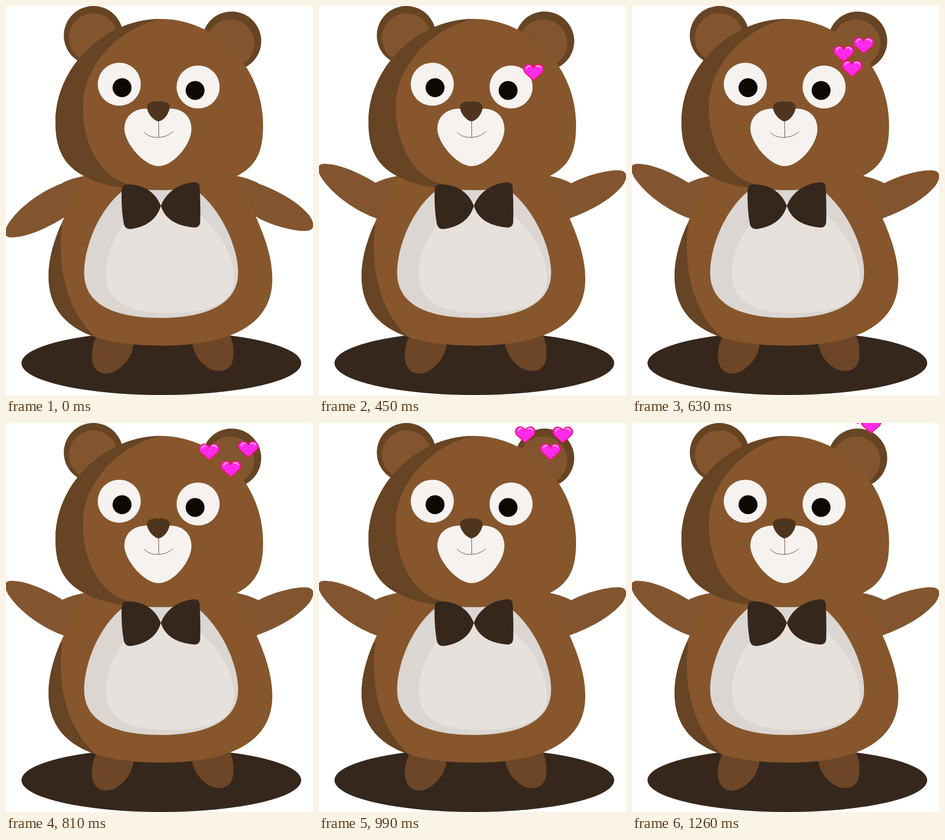
Write an HTML page that moves like this. It is 664 px wide and 843 px high and loops after 1.35 s.

```html
<!DOCTYPE html>
<html lang="en">
<head>
<meta charset="utf-8">
<title>Waving bear</title>
<style>
  html, body { margin: 0; width: 100%; height: 100%; overflow: hidden; background: #fff; }
  svg { display: block; width: 664px; height: 843px; }
  .fur { fill: #87562c; }
  .limb { fill: #82552f; }
  .shade { fill: #664424; }
  .leg { fill: #6c4626; }
  .dark { fill: #36271d; }
  .white { fill: #f6f2ef; }
  .pupil { fill: #0d0802; }
</style>
</head>
<body>
<svg viewBox="0 0 664 843">
  <defs>
    <path id="body" d="M168 368C150 420 92 500 92 585C92 705 205 736 335 736C465 736 576 702 576 592C576 510 525 430 500 368Z"/>
    <path id="head" d="M335 28C448 28 556 125 556 258C556 310 545 345 500 368C460 390 400 399 335 399C270 399 210 392 168 368C125 345 107 310 107 252C107 130 215 28 335 28Z"/>
    <clipPath id="inBody"><use href="#body"/></clipPath>
    <clipPath id="inHead"><use href="#head"/></clipPath>
    <g id="heart">
      <path d="M0 18L-18 2C-26-7-18-18-9-16Q-3-15 0-9Q3-15 9-16C18-18 26-7 18 2Z" fill="#ff2bea" stroke="#f5106a" stroke-width="2"/>
      <path d="M-15-8Q-13-13-8-13M6-12Q12-15 16-9" fill="none" stroke="#ff9df3" stroke-width="3" stroke-linecap="round"/>
    </g>
  </defs>

  <ellipse class="dark" cx="336" cy="774" rx="302.5" ry="69"/>
  <path class="leg" d="M195 718C186 735 183 760 188 775C196 800 222 801 240 789C262 774 274 755 276 730Z"/>
  <path class="leg" d="M402 728C406 755 420 775 442 787C465 796 484 790 490 770C495 745 490 725 483 710Z"/>

  <!-- shoulders stay, arms flip -->
  <path class="limb" d="M172 368Q145 372 122 383L200 440ZM497 368Q522 372 546 384L470 440Z"/>
  <g id="arms" class="limb">
    <path d="M122 383C90 363 45 342 12 342C-7 342-3 358 5 372C30 410 80 445 126 461L200 440V432Z"/>
    <path d="M546 384C575 368 620 356 645 356C670 356 668 372 656 390C630 420 590 443 540 461L470 440V432Z"/>
  </g>

  <use href="#body" class="fur"/>
  <path class="shade" clip-path="url(#inBody)" d="M122 475C114 530 120 590 140 640Q160 690 200 724L60 740V475Z"/>
  <path fill="#dbd6d2" d="M335 370C230 370 169 500 169 578C169 654 247 676 335 676C425 676 502 650 502 578C502 500 430 370 335 370Z"/>
  <path fill="#e6e1dd" d="M335 425C290 415 216 500 216 580C216 650 280 665 350 665C430 665 493 650 493 590C493 510 405 412 335 425Z"/>

  <circle class="shade" cx="189" cy="64" r="64"/>
  <circle class="limb" cx="189" cy="69" r="53"/>
  <circle class="shade" cx="488" cy="76" r="64"/>
  <circle class="limb" cx="485" cy="81" r="52"/>
  <use href="#head" class="fur"/>
  <path class="shade" clip-path="url(#inHead)" d="M335 28C250 45 166 125 166 218C166 300 205 375 270 387V410H60V0H335Z"/>

  <circle class="white" cx="245" cy="169.5" r="46.5"/>
  <circle class="white" cx="415.5" cy="175.5" r="46.5"/>
  <circle class="pupil" cx="251" cy="177" r="20.5"/>
  <circle class="pupil" cx="409" cy="183" r="20.5"/>
  <path class="white" d="M330 232C315 215 256 218 256 267C258 300 300 347 330 347C362 347 401 300 401 267C401 218 345 215 330 232Z"/>
  <path d="M299 273C310 289 345 289 361 272M330 249L330.5 285" fill="none" stroke="#50351e"/>
  <path fill="#50351e" d="M330 207C342 206 354 209 354 219C353 236 338 250 330 250C322 250 305 234 305 219C305 209 318 206 330 207Z"/>

  <path class="dark" d="M335 433C322 400 292 384 258 387Q250 389 250 402Q249 440 255 473Q258 485 272 483C302 478 326 464 335 433C346 404 374 384 408 382Q419 382 419 394Q421 435 420 468Q419 481 406 480C368 476 344 462 335 433Z"/>
  <g id="hearts"></g>
</svg>
<script>
  const LOOP = 1350, STEP = 90;
  const $ = id => document.getElementById(id);

  // Each heart drifts through [ms, x, y] waypoints and appears at its first.
  const paths = [
    [[450, 464, 143], [630, 458, 103], [900, 430, 41], [1080, 462, 8], [1260, 488, -17]],
    [[540, 489, 103], [630, 501, 85], [900, 535.5, 42], [1080, 519, 8], [1260, 511, -27]],
    [[630, 476, 135], [900, 491.5, 81], [1080, 509.5, 42], [1260, 517, 4]]
  ];
  const hearts = paths.map(() => {
    const heart = document.createElementNS("http://www.w3.org/2000/svg", "use");
    heart.setAttribute("href", "#heart");
    return $("hearts").appendChild(heart);
  });

  function positionAt(path, t) {
    const i = Math.max(1, path.findIndex(p => p[0] >= t));
    const [t0, x0, y0] = path[i - 1], [t1, x1, y1] = path[i];
    const k = (t - t0) / (t1 - t0);
    return [x0 + (x1 - x0) * k, y0 + (y1 - y0) * k];
  }

  function draw(now) {
    const t = Math.floor(now % LOOP / STEP) * STEP;
    $("arms").setAttribute("transform", t < STEP ? "matrix(1 0 0 -1 0 843.5)" : "");
    hearts.forEach((heart, i) => {
      heart.setAttribute("visibility", t < paths[i][0][0] ? "hidden" : "visible");
      heart.setAttribute("transform", `translate(${positionAt(paths[i], t)})`);
    });
  }

  const start = performance.now();
  function tick() {
    draw(performance.now() - start);
    requestAnimationFrame(tick);
  }
  tick();
</script>
</body>
</html>
```
